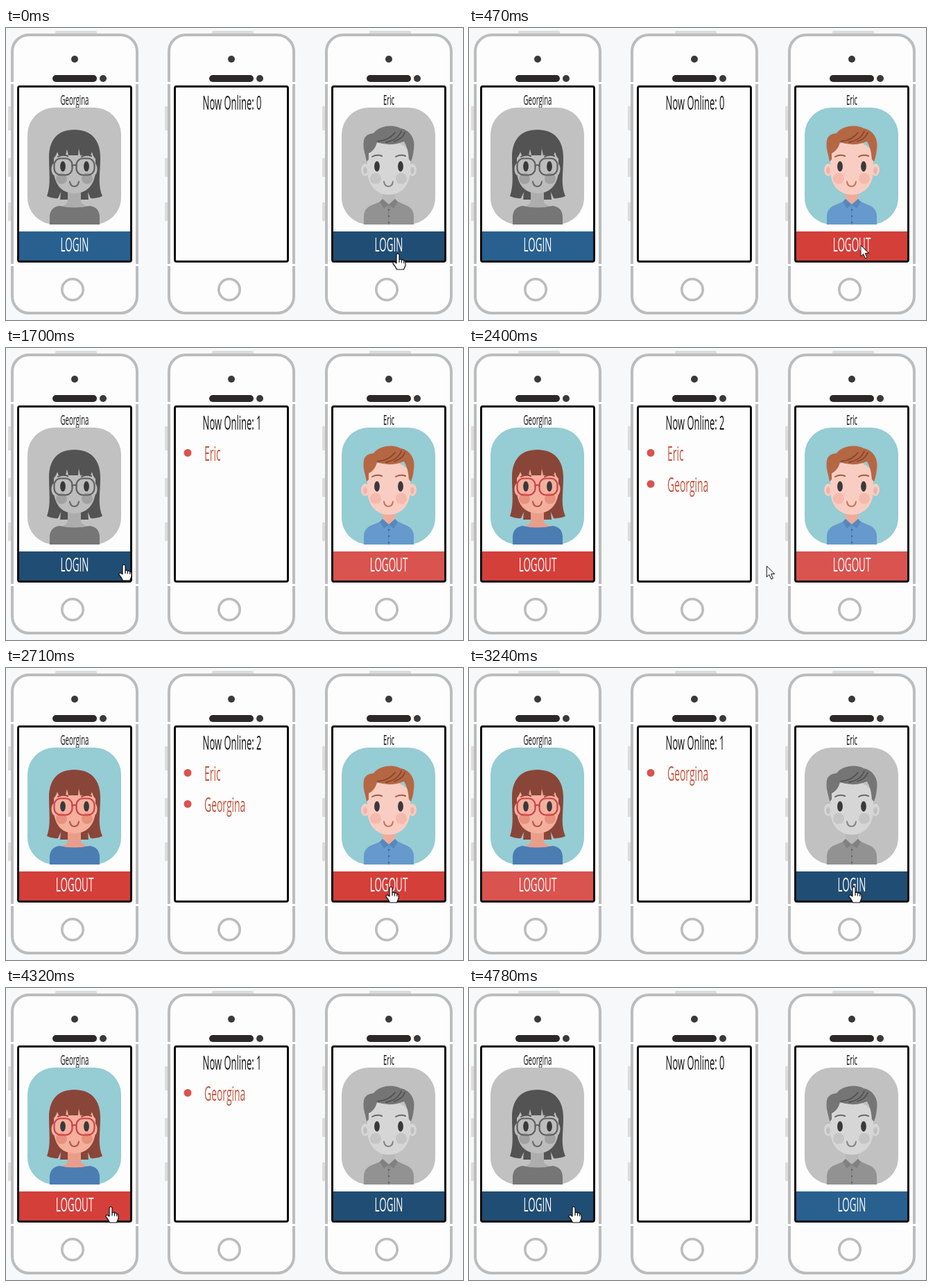
These frames come from a looping animation (659 by 422 pixels, 5.4 s). An HTML page:

```html
<!DOCTYPE html>
<html lang="en">
<head>
<meta charset="utf-8">
<style>
  html, body { margin: 0; width: 100%; height: 100%; overflow: hidden; background: #f7f8fa; }
  svg { display: block; width: 659px; height: 422px; }
  text { font-family: "Open Sans", "Noto Sans", sans-serif; }
  .line { fill: none; stroke-linecap: round; stroke-linejoin: round; }
</style>
</head>
<body>
<svg id="stage" viewBox="0 0 659 422"></svg>
<script>
const LOOP = 5400;
const GRAY = "#bcbcbc";
const names = { left: "Georgina", right: "Eric" };

// One narrow, tall lettering style for every label.
const label = (x, y, size, content, { id = "", fill = "#111", anchor = "middle" } = {}) =>
  `<text id="${id}" transform="translate(${x} ${y}) scale(.48 1)" font-size="${size}" fill="${fill}" text-anchor="${anchor}">${content}</text>`;
const rect = (x, y, w, h, fill, extra = "") =>
  `<rect x="${x}" y="${y}" width="${w}" height="${h}" fill="${fill}" ${extra}/>`;
const oval = (x, y, rx, ry, fill, extra = "") =>
  `<ellipse cx="${x}" cy="${y}" rx="${rx}" ry="${ry}" fill="${fill}" ${extra}/>`;
const shape = (d, fill) => `<path d="${d}" fill="${fill}"/>`;
const line = (d, color, width) => `<path class="line" d="${d}" stroke="${color}" stroke-width="${width}"/>`;
const both = draw => draw(82) + draw(116);

const phone = (x, content) => `<g transform="translate(${x} 0)">
  ${rect(71, 4, 60, 8, "#dcdcdc", 'rx="2"')}
  ${[[113, 35], [188, 27], [252, 27]].map(([y, h]) => rect(3, y, 8, h, "#dcdcdc", 'rx="1"')).join("")}
  ${rect(9, 10, 180, 402, "#fdfdfd", `rx="24" stroke="${GRAY}" stroke-width="4"`)}
  ${[78, 341].map(y => rect(6, y, 6, 3, "#fdfdfd") + rect(186, y, 6, 3, "#fdfdfd")).join("")}
  ${oval(99, 45, 5, 5, "#3b3939")}${oval(140, 73, 5, 5, "#3b3939")}
  ${rect(67, 68, 64, 10, "#2c2828", 'rx="5"')}
  <circle cx="96" cy="378" r="15.2" fill="#fdfdfd" stroke="${GRAY}" stroke-width="3.6"/>
  ${content}
  ${rect(17.5, 84.5, 163, 253, "none", 'rx="2.5" stroke="#0c0c0c" stroke-width="3"')}
</g>`;

const member = (side, portrait) => `
  ${label(99, 111, 20, names[side])}
  <g id="${side}Face">${rect(31, 115, 135, 169, "#96ccd3", 'rx="39"')}${portrait}</g>
  ${rect(18, 294, 162, 43, "#286090", `id="${side}Button"`)}
  ${label(99, 323, 28, "", { id: side + "Label", fill: "#fff" })}`;

const features = (brow, cheek, skinLine) =>
  both(x => oval(x, 200, 3.9, 7.5, "#3b383d")) +
  oval(80, 217.5, 8, 8, cheek) + oval(117, 217.5, 8, 8, cheek) +
  both(x => line(`M${x - 7} 186 Q${x} 182 ${x + 7} 185`, brow, 2)) +
  line("M92 222 Q93 229 98.5 229 Q104 229 105 222", skinLine, 2);

const woman = [
  shape("M98.5 147 C75 147 62 161 62 187 C62 211 65 226 59 243 Q67 247 75 246 L79 237 L78 248 H119 L118 237 L122 246 Q131 247 139 243 C132 226 136 211 136 187 C136 161 122 147 98.5 147Z", "#8a4539"),
  shape("M89 232 H108 V252 Q114 258 121 258 Q99 266 77 258 Q88 257 89 250Z", "#e99e8b"),
  oval(70, 204, 4.5, 9, "#f4b09d"), oval(127, 204, 4.5, 9, "#f4b09d"),
  shape("M69 180 Q98 166 129 180 V207 C128 228 115 239 99 239 C82 239 70 228 69 207Z", "#f4b09d"),
  shape("M66 190 V170 Q76 154 98 154 Q123 155 131 170 V190 Q126 188 124 179 L122 184 H107 L105 174 L104 184 H90 L88 175 L86 184 H76 L74 179 Q71 188 66 190Z", "#8a4539"),
  features("#8a4539", "#e8917f", "#ad5749"),
  [69.5, 101.5].map(x => rect(x, 188.5, 26, 24, "none", 'rx="9.5" stroke="#cd4148" stroke-width="2.2"')).join(""),
  line("M95.5 199 Q98.5 197 101.5 199", "#cd4148", 2.2),
  shape("M63 284 V272 Q64 259 77 257 Q98 262 121 257 Q134 259 135 272 V284Z", "#4b7db3")
].join("");

const man = [
  shape("M90 232 H108 V250 L99 258 L90 250Z", "#efac9b"),
  oval(65, 205, 6, 9, "#f9cdc2"), oval(133, 205, 6, 9, "#f9cdc2"),
  oval(65, 206, 2.7, 5, "#efb4a6"), oval(133, 206, 2.7, 5, "#efb4a6"),
  shape("M68 178 Q98 148 130 178 V207 C129 229 116 241 99 241 C82 241 69 229 68 207Z", "#f9cdc2"),
  shape("M67 193 C65 181 61 174 63 162 Q65 153 77 152 C86 140 107 139 116 145 C129 147 138 160 135 175 Q134 186 131 193 L128 190 Q127 174 121 164 Q101 172 82 165 Q79 177 70 181 V190Z", "#b56743"),
  line("M83 164 Q100 162 108 151 M95 165 Q112 162 117 149 M107 164 Q119 160 122 151", "#874530", 1.8),
  features("#a65b3d", "#f6b9ad", "#c37766"),
  shape("M63 284 V271 Q64 259 77 255 L91 249 L99 255 L108 249 L121 255 Q134 259 135 271 V284Z", "#6699cc"),
  shape("M90 247 L99 255 L92 261 L86 251Z M108 247 L99 255 L106 261 L112 251Z", "#5688bd"),
  line("M99 257 V284", "#5486ba", .8),
  [263, 272, 281].map(y => oval(99, y, 1.2, 1.2, "#39699e")).join("")
].join("");

const row = i => `<g id="row${i}">${oval(36, 151.5 + 45 * i, 5.5, 5.5, "#d9534f")}
  ${label(60, 163 + 45 * i, 29, "", { id: "name" + i, fill: "#c6553c", anchor: "start" })}</g>`;

const $ = id => document.getElementById(id);
$("stage").innerHTML =
  phone(0, member("left", woman)) +
  phone(226, label(100, 118, 27, "", { id: "count" }) + row(0) + row(1)) +
  phone(453, member("right", man)) +
  `<g id="pointer" stroke-linejoin="round">
    <path id="hand" fill="#fff" stroke="#111" stroke-width="1.2" d="M-2 1.5 Q0 -1 2 1.5 V9 Q4.5 7 5.5 9.5 Q8 8 8.7 10.7 Q11 10 11 13 V17 Q10 20 8.5 23 H-1.5 Q-3 19 -7 14.5 Q-7 11 -4 12.5 L-2 14Z M2 9 V13 M5.5 9.5 V13.5 M8.7 10.7 V14"/>
    <path id="arrow" fill="#fff" stroke="#111" d="M0 0 V16 L3.7 12.6 L6.5 19 L9 18 L6.3 11.6 H11.5Z"/>
  </g>`;

// The pointer advances in discrete steps and slows toward each goal.
const moves = [
  { start: 70, end: 150, steps: 2, x: 565, y: 314, power: 1 },
  { start: 540, end: 1470, steps: 13, x: 170, y: 313, power: 1.78 },
  { start: 2240, end: 2710, steps: 7, x: 555, y: 316, power: 2 },
  { start: 3550, end: 4320, steps: 11, x: 151, y: 316, power: 1.32 }
];

function pointerAt(t) {
  let x = 565, y = 326;
  for (const m of moves) {
    if (t < m.start) break;
    const step = Math.floor((t - m.start) / (m.end - m.start) * (m.steps - 1) + 1e-6) + 1;
    const p = 1 - (1 - Math.min(1, step / m.steps)) ** m.power;
    x += (m.x - x) * p;
    y += (m.y - y) * p;
  }
  return { x, y };
}

const within = (t, ...spans) => spans.some(([from, to]) => t >= from && t < to);

function drawMember(side, online, hot) {
  $(side + "Face").style.filter = online ? "none" : "grayscale(1)";
  $(side + "Button").setAttribute("fill",
    online ? (hot ? "#d43f3a" : "#d9534f") : (hot ? "#204d74" : "#286090"));
  $(side + "Label").textContent = online ? "LOGOUT" : "LOGIN";
}

function draw(t) {
  drawMember("left", within(t, [1850, 4630]), within(t, [1390, 3090], [4245, LOOP]));
  drawMember("right", within(t, [470, 3240]), within(t, [0, 1700], [2475, 4630]));

  const online = [];
  if (within(t, [620, 3240])) online.push(names.right);
  if (within(t, [2020, 4780])) online.push(names.left);
  $("count").textContent = "Now Online: " + online.length;
  [0, 1].forEach(i => {
    $("row" + i).style.display = online[i] ? "" : "none";
    $("name" + i).textContent = online[i] || "";
  });

  const { x, y } = pointerAt(t);
  const overButton = x < 181 || x > 471;
  const hand = overButton && !within(t, [470, 1000], [1850, 2400]);
  $("pointer").setAttribute("transform", `translate(${x.toFixed(1)} ${y.toFixed(1)})`);
  $("hand").style.display = hand ? "" : "none";
  $("arrow").style.display = hand ? "none" : "";
}

const begin = performance.now();
function tick() {
  draw((performance.now() - begin) % LOOP);
  requestAnimationFrame(tick);
}
tick();
</script>
</body>
</html>
```
